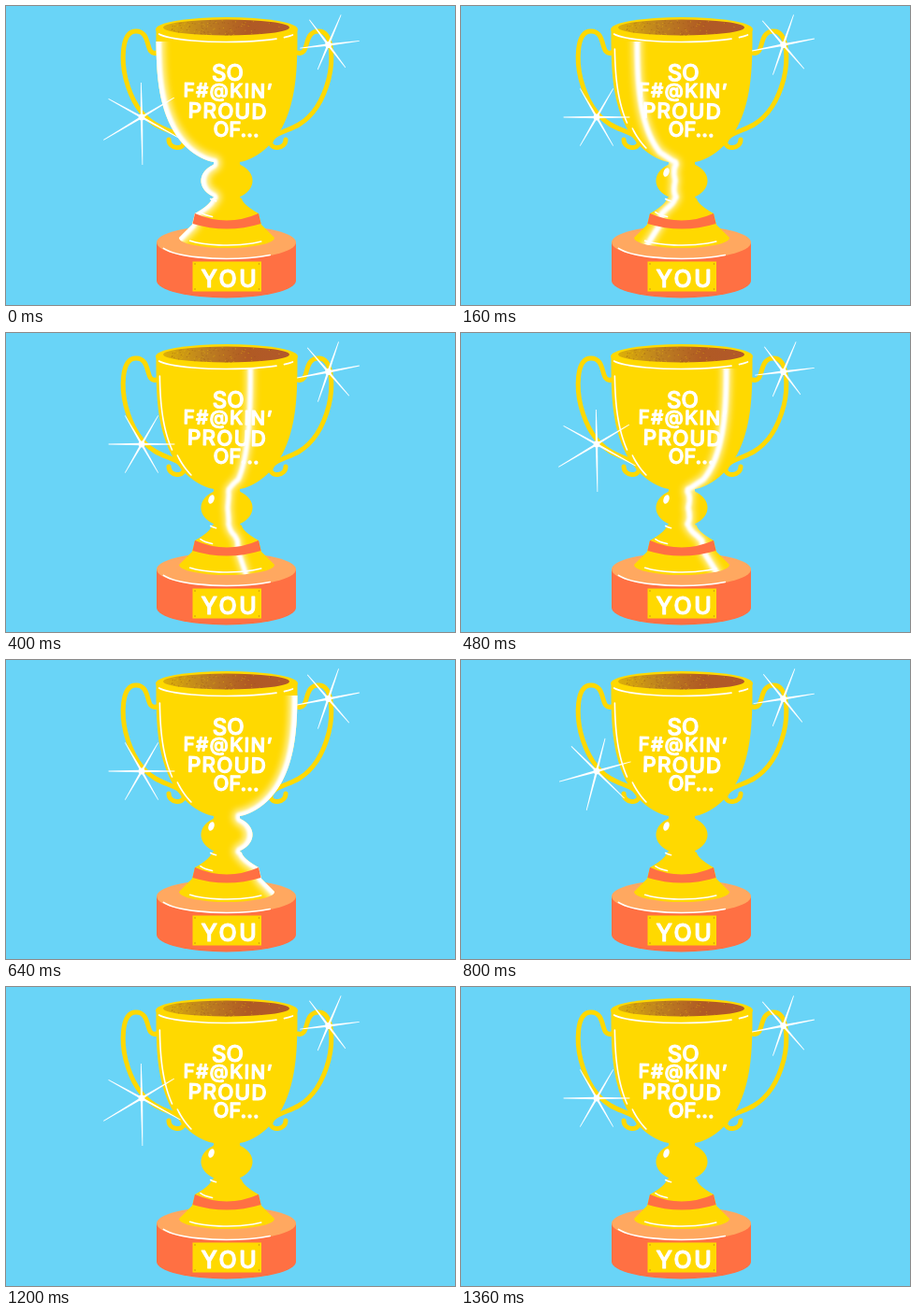
Animation of 480 by 320 pixels, one loop 1440 ms. Source, as an HTML page with a canvas:

```html
<!DOCTYPE html>
<html lang="en">
<head>
<meta charset="utf-8">
<title>Trophy</title>
<style>
html, body { margin: 0; width: 100%; height: 100%; overflow: hidden; background: #69d4f7; }
canvas { display: block; width: 480px; height: 320px; }
</style>
</head>
<body>
<canvas id="stage" width="480" height="320"></canvas>
<script>
const ctx = document.getElementById('stage').getContext('2d');
const SKY = '#69d4f7', GOLD = '#ffd900', ORANGE = '#ff7043', PEACH = '#ffa860', WHITE = '#fff';
const STEP = 80, STEPS = 18, SWEEP = 8, CX = 236, TOP = 25, FOOT = 248;
const rad = degrees => degrees * Math.PI / 180;

// tilt: angle of the first ray; turn and grow: change per pose; stretch: unevenness of the rays
const SPARKLES = [
  { x: 145, y: 119, tilt: -91, turn: 15.5, length: 44, grow: -4.3, stretch: 7 },
  { x: 344.5, y: 41.5, tilt: -67, turn: -2, length: 32, grow: 1, stretch: -3 }
];

// Half the trophy's width at a given height
function half(y) {
  if (y < 167) return 75.5 * Math.sqrt(1 - ((y - TOP) / 144) ** 3);
  if (y < 206) return Math.max(14, 27.5 * Math.sqrt(Math.max(0, 1 - ((y - 187) / 20) ** 2)));
  if (y < 222) return 16 + 18 * ((y - 206) / 16) ** 1.6;
  if (y < 234) return 34 + (y - 222) / 4;
  return 37 + 14 * ((y - 234) / 14);
}

// Line of longitude on the turned body: s runs from -1 (left edge) to 1 (right edge)
function meridian(s, from = TOP, to = FOOT, bend = 0) {
  const points = [];
  for (let y = from; y <= to; y++) {
    const power = 1 + bend * Math.max(0, 1 - Math.abs(y - 187) / 30);
    points.push([CX + Math.sign(s) * Math.abs(s) ** power * half(y), y]);
  }
  return points;
}

function stroke(path, color, width) {
  ctx.strokeStyle = color;
  ctx.lineWidth = width;
  path ? ctx.stroke(path) : ctx.stroke();
}

function line(points, color, width) {
  ctx.beginPath();
  points.forEach(p => ctx.lineTo(...p));
  stroke(null, color, width);
}

// Highlight along the front of a ring, from left to right
function gleam(y, rx, ry, from, to) {
  ctx.beginPath();
  ctx.ellipse(CX, y, rx, ry, 0, rad(from), rad(to), true);
  stroke(null, WHITE, 1.6);
}

function ellipse(x, y, rx, ry, fill, turn = 0) {
  ctx.beginPath();
  ctx.ellipse(x, y, rx, ry, turn, 0, Math.PI * 2);
  ctx.fillStyle = fill;
  ctx.fill();
}

function gradient(from, to, ...colors) {
  const g = ctx.createLinearGradient(from, 0, to, 0);
  colors.forEach((color, i) => g.addColorStop(i / (colors.length - 1), color));
  return g;
}

function bodyPath() {
  ctx.beginPath();
  meridian(-1).forEach(p => ctx.lineTo(...p));
  ctx.ellipse(CX, FOOT, 51, 11, 0, Math.PI, 0, true);
  meridian(1).reverse().forEach(p => ctx.lineTo(...p));
  ctx.closePath();
}

const HANDLE = new Path2D(`M161 50 C148 54 156 27 139 27 C122 27 124 62 128 78
  C134 101 145 118 160 127 C172 134 191 137 190 147 C189 154 174 153 174 143`);

function handles() {
  stroke(HANDLE, GOLD, 5);
  ctx.save();
  ctx.translate(2 * CX + 1, 0);
  ctx.scale(-1, 1);
  stroke(HANDLE, GOLD, 5);
  ctx.restore();
}

function pedestal() {
  ctx.beginPath();
  ctx.ellipse(CX - 0.5, 294, 74.5, 18.5, 0, Math.PI, 0, true);
  ctx.lineTo(CX + 74, 253);
  ctx.lineTo(CX - 75, 253);
  ctx.fillStyle = ORANGE;
  ctx.fill();
  ellipse(CX - 0.5, 253, 74.5, 18, PEACH);
  gleam(253.5, 72, 17, 160, 50);

  ctx.fillStyle = GOLD;
  ctx.fillRect(199.5, 273.5, 73.5, 32);
  for (const x of [202, 270.5]) for (const y of [276, 303]) ellipse(x, y, 0.8, 0.8, '#c98f13');
}

function collar() {
  ctx.beginPath();
  ctx.moveTo(202, 222);
  ctx.quadraticCurveTo(CX, 237, 270, 222);
  ctx.lineTo(272.5, 233);
  ctx.quadraticCurveTo(CX, 244, 199.5, 233);
  ctx.closePath();
  ctx.fillStyle = ORANGE;
  ctx.fill();
}

// Opening of the cup, with grain that thins out towards the right
function hollow() {
  ellipse(235.5, 23, 67.5, 8.5, gradient(168, 303, '#dcb008', '#bd8020', '#b05a24', '#b2582a'));
  let seed = 7;
  const random = () => (seed = seed * 16807 % 2147483647) / 2147483647;
  for (let i = 0; i < 250; i++) {
    const angle = random() * Math.PI * 2, r = Math.sqrt(random());
    const x = Math.cos(angle) * r, y = Math.sin(angle) * r;
    if (random() * 2 - 1 < x) continue;
    ctx.fillStyle = i % 2 ? 'rgba(240,195,10,.5)' : 'rgba(140,75,25,.4)';
    ctx.fillRect(235.5 + x * 66, 23 + y * 8, 1, 1);
  }
}

function shine(s) {
  const edge = s ** 4, path = meridian(s, TOP, FOOT + 10, 2);
  ctx.save();
  bodyPath();
  ctx.clip();
  ctx.beginPath();
  ctx.rect(150, 38, 172, 230);
  ctx.clip();
  ctx.filter = 'blur(3.5px)';
  line(path, 'rgba(255,255,255,.7)', 9 + 6 * edge);
  ctx.filter = 'blur(1.2px)';
  line(path, WHITE, 5 + 3 * edge);
  ctx.restore();
}

function trophy(index) {
  handles();
  pedestal();
  bodyPath();
  ctx.fillStyle = GOLD;
  ctx.fill();
  ellipse(CX, TOP, 76, 13, GOLD);
  if (index <= SWEEP) shine(Math.sin((index - SWEEP / 2) * 0.342));
  hollow();
  collar();

  gleam(27, 75, 11.5, 165, 45);
  gleam(27, 75, 11.5, 35, 20);
  gleam(245, 48, 11, 145, 40);
  gleam(216, 31, 11, 155, 120);
  gleam(203, 20, 7, 150, 125);
  if (index > 0) {
    line(meridian(-0.95, 46, 125), WHITE, 1.6);
    line(meridian(-0.9, 131, 152), WHITE, 1.6);
    ellipse(219.5, 178, 3, 5, WHITE, 0.35);
  }
}

function word(text, x, y, size, spacing, turn = 0) {
  ctx.save();
  ctx.translate(x, y);
  ctx.rotate(turn);
  ctx.font = `500 ${size}px Inter, sans-serif`;
  ctx.letterSpacing = spacing + 'px';
  ctx.fillStyle = WHITE;
  ctx.fillText(text, 0, 0);
  ctx.strokeStyle = WHITE;
  ctx.lineWidth = 1.2;
  ctx.strokeText(text, 0, 0);
  ctx.restore();
}

function lettering(pose) {
  const shift = pose * 0.4;
  word('SO', 220 + shift, 79.5, 24, 0);
  word('F#@KIN’', 189.5, 97, 20.5, 1.4, 0.015);
  word('PROUD', 194.5 - shift, 119.5, 22.5, 1.2, 0.02);
  word('OF...', 221.5, 139.5, 22, 0, 0.01);
  word('YOU', 208.5, 300.5, 25, 2.5);
}

function sparkle({ x, y, tilt, turn, length, grow, stretch }, pose) {
  ctx.fillStyle = WHITE;
  for (let i = 0; i < 6; i++) {
    const reach = length + grow * pose - stretch * Math.cos(rad(60 * i)) * (1 - pose / 2);
    ctx.save();
    ctx.translate(x, y);
    ctx.rotate(rad(tilt + turn * pose + 60 * i));
    ctx.beginPath();
    ctx.moveTo(0, -1.2);
    ctx.lineTo(reach, -0.4);
    ctx.lineTo(reach, 0.4);
    ctx.lineTo(0, 1.2);
    ctx.fill();
    ctx.restore();
  }
  ellipse(x, y, 3.4, 3.4, WHITE);
}

function draw(now) {
  const index = Math.floor(now / STEP) % STEPS, pose = index % 3;
  ctx.lineCap = ctx.lineJoin = 'round';
  ctx.fillStyle = SKY;
  ctx.fillRect(0, 0, 480, 320);
  trophy(index);
  lettering(pose);
  SPARKLES.forEach(s => sparkle(s, pose));
}

let start;
function tick(now) {
  start ??= now;
  draw(now - start);
  requestAnimationFrame(tick);
}
draw(0);
requestAnimationFrame(tick);
</script>
</body>
</html>
```
